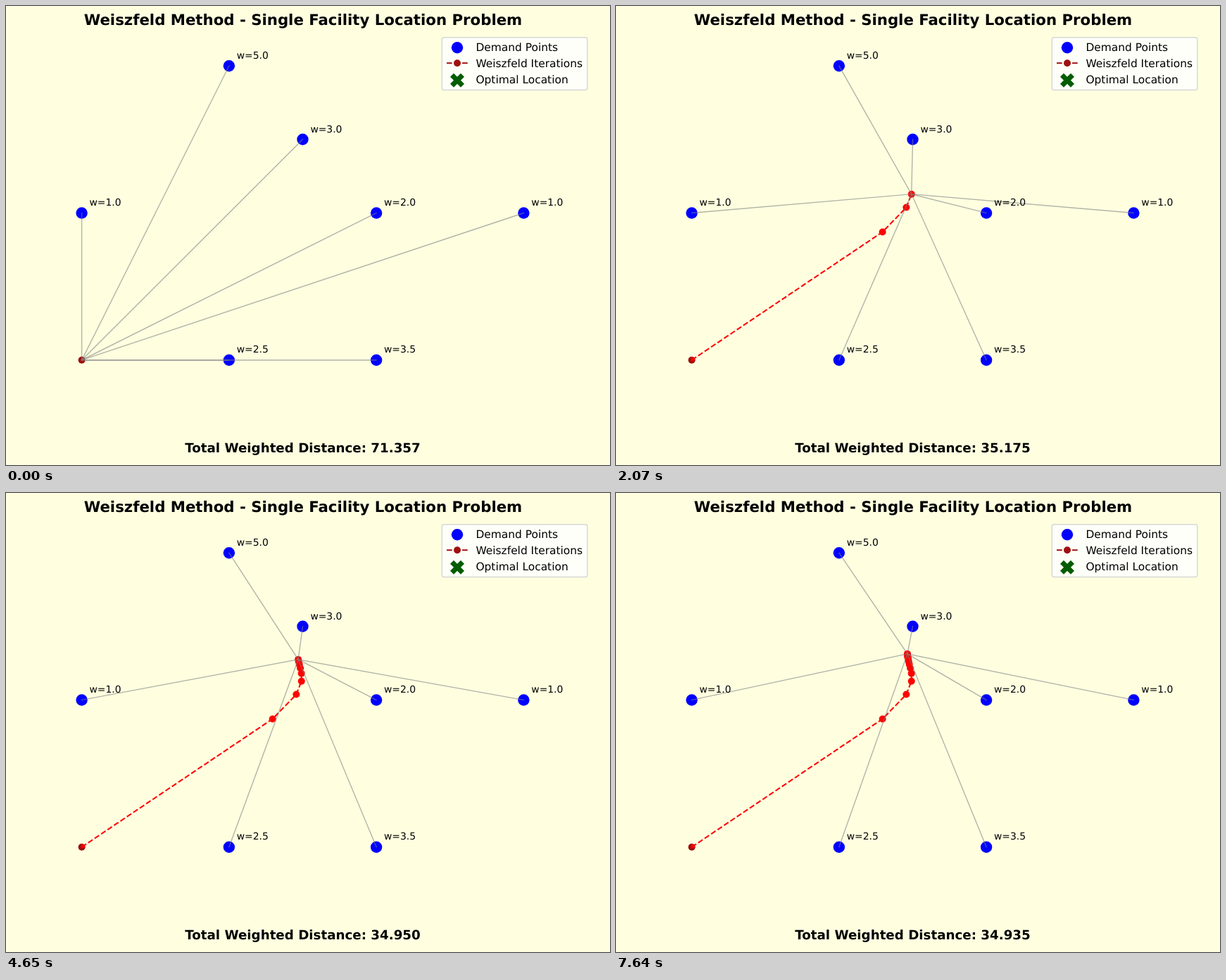
Recreate the animation shown at these times as an HTML page with a canvas. Size 858 px wide and 653 px high, loop 8000 ms.

```html
<!DOCTYPE html>
<html lang="en">
<head>
<meta charset="utf-8">
<title>Weiszfeld Method</title>
<style>
  html, body { margin: 0; width: 100%; height: 100%; overflow: hidden; background: #ffffe0; }
  canvas { display: block; }
</style>
</head>
<body>
<canvas id="stage" width="858" height="653"></canvas>
<script>
const ctx = document.getElementById('stage').getContext('2d');
const LOOP = 8000;
const STEPS = [1060, 1540, 2070, 2600, 3060, 3590, 4120, 4650, 5110, 5710, 6170, 6640, 7160, 7640];
const RED = '#ff0000', DARK_RED = '#a01010', BLUE = '#0000ff', GREEN = '#045c04';
const LINE = 2.08, DOT = 5;

// Demand points: x, y, weight
const demand = [
  [0, 2, 1], [2, 4, 5], [3, 3, 3], [4, 2, 2], [6, 2, 1], [2, 0, 2.5], [4, 0, 3.5]
].map(([x, y, w]) => ({ x, y, w }));

const px = p => 107.6 + 104.63 * p.x;
const py = p => 503.7 - 104.63 * p.y;
const dist = (a, b) => Math.hypot(a.x - b.x, a.y - b.y);
const cost = p => demand.reduce((sum, d) => sum + d.w * dist(d, p), 0);

function weiszfeld(p) {
  let x = 0, y = 0, total = 0;
  for (const d of demand) {
    const k = d.w / dist(d, p);
    x += k * d.x;
    y += k * d.y;
    total += k;
  }
  return { x: x / total, y: y / total };
}

const path = [{ x: 0, y: 0 }];
for (const _ of STEPS) path.push(weiszfeld(path[path.length - 1]));

function circle(x, y, r, color) {
  ctx.fillStyle = color;
  ctx.beginPath();
  ctx.arc(x, y, r, 0, 2 * Math.PI);
  ctx.fill();
}

function polyline(points, color, width, dash = []) {
  ctx.strokeStyle = color;
  ctx.lineWidth = width;
  ctx.setLineDash(dash);
  ctx.lineCap = dash.length ? 'butt' : 'square';
  ctx.lineJoin = 'round';
  ctx.beginPath();
  for (const [x, y] of points) ctx.lineTo(x, y);
  ctx.stroke();
  ctx.setLineDash([]);
}

const dashed = (points, color) => polyline(points, color, LINE, [3.7 * LINE, 1.6 * LINE]);

function text(str, x, y, size, align = 'left', weight = 'normal') {
  ctx.font = `${weight} ${size}px "DejaVu Sans", sans-serif`;
  ctx.textAlign = align;
  ctx.fillStyle = '#000';
  ctx.fillText(str, x, y);
}

function cross(x, y, u) {
  ctx.fillStyle = GREEN;
  ctx.beginPath();
  for (let q = 0; q < 4; q++) {
    const c = Math.round(Math.cos(q * Math.PI / 2)), s = Math.round(Math.sin(q * Math.PI / 2));
    for (const [a, b] of [[1, 0], [2, 1], [1, 2]]) {
      ctx.lineTo(x + u * (a * c - b * s), y + u * (a * s + b * c));
    }
  }
  ctx.fill();
}

function legend() {
  ctx.beginPath();
  ctx.roundRect(619.3, 44.7, 206.6, 74.8, 3);
  ctx.fillStyle = 'rgba(255,255,255,0.8)';
  ctx.fill();
  ctx.strokeStyle = 'rgba(204,204,204,0.8)';
  ctx.lineWidth = 1.39;
  ctx.stroke();
  circle(641, 59.2, 8.2, BLUE);
  dashed([[626, 81.3], [656.5, 81.3]], DARK_RED);
  circle(641, 81.3, DOT, DARK_RED);
  cross(641, 105.7, 5);
  text('Demand Points', 667.4, 64, 15.45);
  text('Weiszfeld Iterations', 667.4, 87, 15.45);
  text('Optimal Location', 667.4, 110, 15.45);
}

function trail(n) {
  const pts = path.slice(0, n + 1).map(p => [px(p), py(p)]);
  const [x0, y0] = pts[0];
  if (n) dashed(pts, RED);
  circle(x0, y0, DOT, DARK_RED);
  if (n) {
    // Brighter rays remain on the starting dot
    for (const d of demand) {
      const a = Math.atan2(py(d) - y0, px(d) - x0);
      polyline([[x0, y0], [x0 + 4 * Math.cos(a), y0 + 4 * Math.sin(a)]], RED, 1.39);
    }
  }
  for (const [x, y] of pts.slice(1)) circle(x, y, DOT, RED);
}

function draw(t) {
  const n = STEPS.filter(s => s <= t).length;
  const here = path[n];
  ctx.textRendering = 'geometricPrecision';
  ctx.fillStyle = '#ffffe0';
  ctx.fillRect(0, 0, 858, 653);

  for (const d of demand) circle(px(d), py(d), 8.2, BLUE);
  trail(n);
  for (const d of demand) {
    polyline([[px(here), py(here)], [px(d), py(d)]], 'rgba(128,128,128,0.6)', 1.39);
  }
  for (const d of demand) text('w=' + d.w.toFixed(1), px(d) + 10.9, Math.round(py(d) - 10.3), 13.89);

  legend();
  text('Weiszfeld Method - Single Facility Location Problem', 422, 27, 21.27, 'center', 'bold');
  text('Total Weighted Distance: ' + cost(here).toFixed(3), 421.5, 635, 18.25, 'center', 'bold');
}

function tick() {
  draw(performance.now() % LOOP);
  requestAnimationFrame(tick);
}
tick();
</script>
</body>
</html>
```
